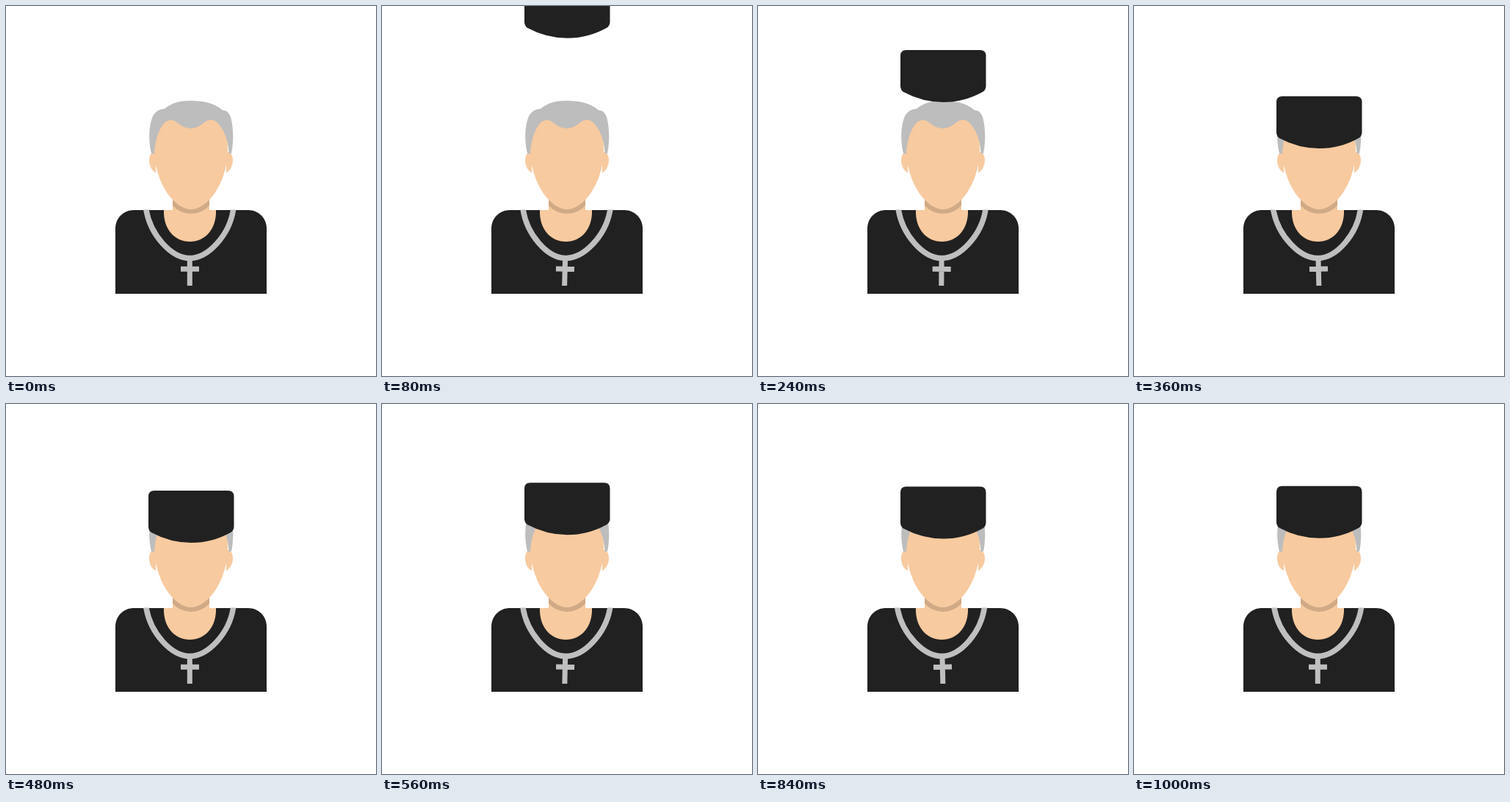
These frames come from a looping animation (504 by 504 pixels, 1040 ms). An HTML page:

```html
<!DOCTYPE html>
<html lang="en">
<head>
<meta charset="utf-8">
<title>Priest</title>
<style>
  html, body { margin: 0; width: 100%; height: 100%; overflow: hidden; background: #fff; }
  svg { display: block; width: 100%; height: 100%; }
</style>
</head>
<body>
<svg viewBox="0 0 504 504">
  <clipPath id="body"><rect x="149" y="277.5" width="206" height="115"/></clipPath>
  <path fill="#212121" d="M149 392V303C149 289 160 278 174 278H330C344 278 355 289 355 303V392Z"/>
  <g fill="#f7ca9f">
    <path d="M227 258H277V278H286C287 304 271 321 250.500 321S214 304 215 278H227Z"/>
    <path fill="#d0aa86" d="M227 264V272Q238 283 252 283T277 272V264Z"/>
    <path d="M204 199C192 197 192 221 204 227Z M300 199C312 197 312 221 300 227Z"/>
    <path d="M202 195C202 167 215 148 252 148S302 167 302 195C302 240 275 277 252 277S202 240 202 195Z"/>
  </g>
  <path fill="#bdbdbd" d="M198 201C194 184 194 164 200 150Q206 140 216 140C225 132 238 129 251 129C268 129 284 132 295 142Q304 142 307 155C310 170 310 186 307 201H303.500C303 184 297 167 287 158Q279 152 271 158C257 170 245 169 232 158Q224 152 216 159C207 169 203 185 202 201Z"/>
  <g clip-path="url(#body)">
    <g id="chain" fill="none" stroke="#bfbfbf">
      <path stroke-width="7.500" d="M190 270L191 278C197 312 225 343.500 250.300 343.500S304 312 309.500 278L310.500 270"/>
      <path stroke-width="7" d="M250.300 343V381M238 358.300H263"/>
    </g>
  </g>
  <path id="hat" fill="#212121" d="M202 0H302.500Q310.500 0 310.500 8V49Q310.500 54 306 57Q281 71 252.500 71T198 57Q194 54 194 49V8Q194 0 202 0Z"/>
</svg>
<script>
  const LOOP = 1040, STEP = 40;
  const LAND = 335, DROP = 183, REST = 112;
  const hat = document.getElementById('hat');
  const chain = document.getElementById('chain');
  // [time in ms, degrees]
  const sway = [[0, 0], [140, 2.4], [250, 0.4], [370, -1.4], [480, 0],
                [580, 1.4], [690, 0.2], [830, -1.4], [1000, 0], [LOOP, 0]];

  // Steady fall, then a damped spring around the resting height
  function hatTop(t) {
    if (t < LAND) return REST - DROP * (1 - t / LAND);
    const s = t - LAND;
    return REST + 30.4 * Math.exp(-s * 0.0069) * Math.sin(Math.PI * s / 177);
  }

  function swayAngle(t) {
    const i = sway.findIndex(k => k[0] > t);
    const [t0, a] = sway[i - 1], [t1, b] = sway[i];
    return a + (b - a) * (1 - Math.cos(Math.PI * (t - t0) / (t1 - t0))) / 2;
  }

  function draw(now) {
    const t = Math.floor((now % LOOP) / STEP) * STEP;
    hat.setAttribute('transform', `translate(0 ${hatTop(t).toFixed(2)})`);
    chain.setAttribute('transform', `rotate(${swayAngle(t).toFixed(3)} 250.300 316)`);
  }

  const start = performance.now();
  function tick() {
    draw(performance.now() - start);
    requestAnimationFrame(tick);
  }
  tick();
</script>
</body>
</html>
```
